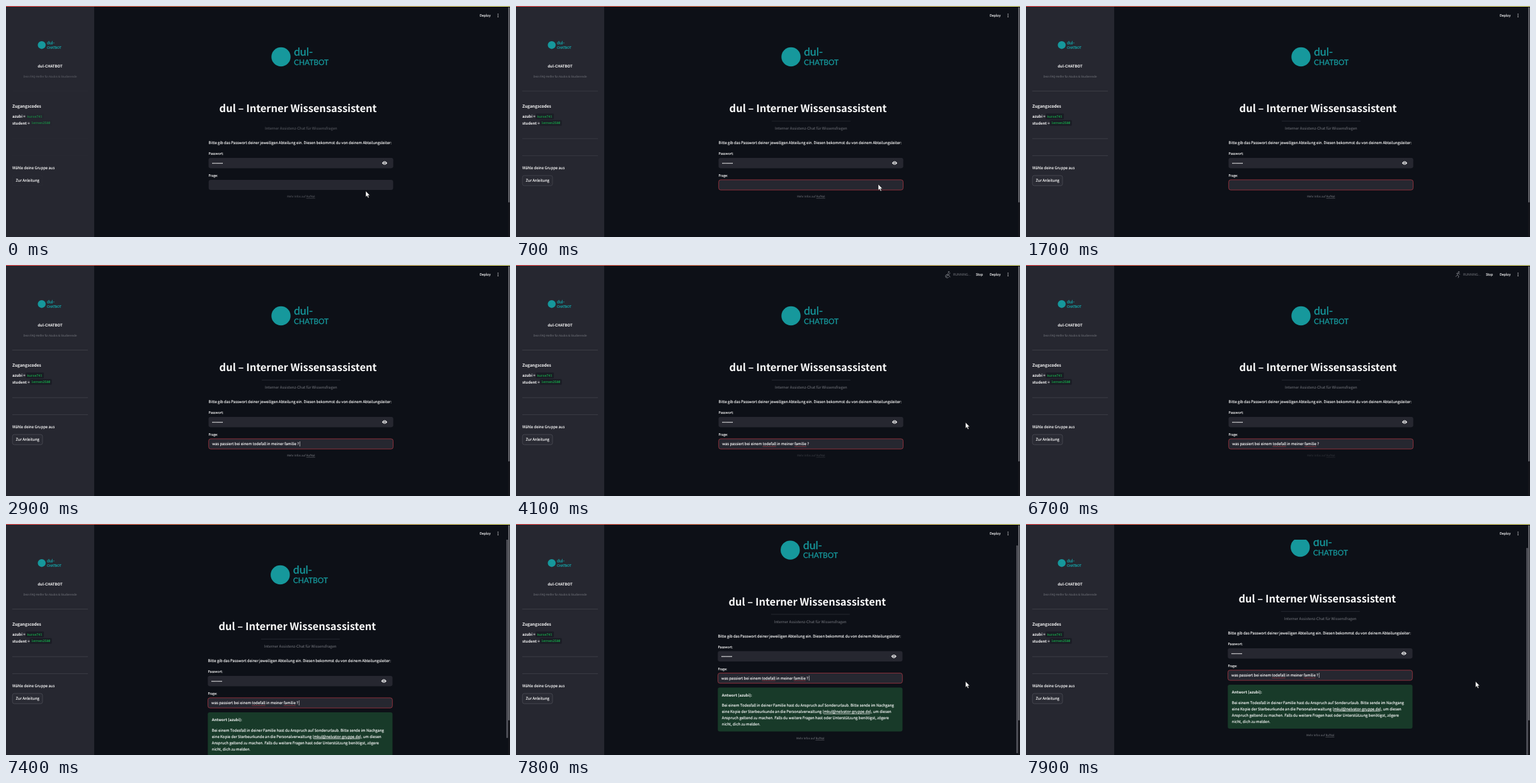
Animation of 800 by 368 pixels, one loop 8000 ms. Source, as an HTML page:

```html
<!DOCTYPE html>
<html lang="de">
<head>
<meta charset="utf-8">
<title>Interner Wissensassistent</title>
<style>
  html, body { margin: 0; width: 100%; height: 100%; overflow: hidden; background: #0d1017; }
  svg { display: block; width: 800px; height: 368px; }
  text {
    font-family: "Noto Sans CJK JP", "Noto Sans CJK SC", "Noto Sans CJK", "Noto Sans", sans-serif;
    color: #fafafa; fill: currentColor; stroke: currentColor; stroke-width: .14;
    text-rendering: geometricPrecision;
  }
  .bold { font-weight: 700; stroke: none; }
  .mid { text-anchor: middle; }
  .muted { color: #7a7c83; stroke: none; }
  .code { font-family: "Noto Sans Mono", "DejaVu Sans Mono", monospace; color: #17a84b; }
  .word { font-family: Lato, Inter, sans-serif; color: #16989c; stroke-width: .3; }
  .mark { fill: #16989c; }
  .link { text-decoration: underline; }
  .rule { stroke: #42434c; stroke-width: .8; }
  .field { fill: #262730; }
</style>
</head>
<body>
<svg id="stage" viewBox="0 0 800 368"></svg>
<script>
const LOOP = 8000, STEP = 100;
const QUESTION = 'was passiert bei einem todefall in meiner familie ?';
const MISSPELT = ['todefall', 'familie'];
const ANSWER = [
  'Bei einem Todesfall in deiner Familie hast du Anspruch auf Sonderurlaub. Bitte sende im Nachgang',
  'eine Kopie der Sterbeurkunde an die Personalverwaltung (<tspan class="link">mkul@nelvator-gruppe.de</tspan>), um diesen',
  'Anspruch geltend zu machen. Falls du weitere Fragen hast oder Unterstützung benötigst, zögere',
  'nicht, dich zu melden.'
];
// Limbs of the status figure: one path per pose, each with its head position.
const POSES = [
  { head: [687, 11.3], limbs: 'M686 13L684.5 16L687 17.5L686 20.5M684.5 16L682 18.8M683 13.5L686 13L689 15' },
  { head: [685, 11.3], limbs: 'M685 13V16.5L688 17.5L687.5 20.5M685 16.5L682 19.5M682 15.5L685 13.3L688.5 12.5' },
  { head: [685.5, 11], limbs: 'M682 13.5H689M685.5 13V16.5M684.6 13.5V20.5M686.4 13.5V20.5' },
  { head: [687, 11.2], limbs: 'M686.5 12.8L684 15.5L687.5 16.5L689 19.5M682 19.5L689.5 12.8M684 15.3A2.6 2.6 0 1 0 686.8 18.8' }
];

// Page pixels to stage font size (page zoom and the font's larger em).
const size = px => (px * .374).toFixed(2);
const text = (x, y, px, str, cls = '', id = '') =>
  `<text x="${x}" y="${y}" font-size="${size(px)}" class="${cls}" id="${id}">${str}</text>`;
const rect = (x, y, w, h, attrs) => `<rect x="${x}" y="${y}" width="${w}" height="${h}" ${attrs}/>`;
const rule = (x1, x2, y) => `<path class="rule" d="M${x1} ${y}H${x2}"/>`;
const disc = (x, y, r, cls) => `<circle cx="${x}" cy="${y}" r="${r}" class="${cls}"/>`;
const wordmark = (x, y1, y2, big, small) =>
  `<text class="word" x="${x}" y="${y1}" font-size="${big}">dul-</text>
   <text class="word" x="${x}" y="${y2}" font-size="${small}">CHATBOT</text>`;
const row = (n, make) => Array.from({ length: n }, (_, i) => make(i)).join('');

const sidebar = `
  ${rect(0, 0, 140, 368, 'fill="#262730"')}
  ${disc(56.7, 62.2, 6.2, 'mark')}${wordmark(65, 61, 68, 7, 4.9)}
  ${text(70, 98, 16, 'dul-CHATBOT', 'bold mid')}
  <g class="soft">${text(70, 113.5, 12, 'Dein FAQ-Helfer für Azubis &amp; Studierende', 'muted mid')}</g>
  <g class="faint">${rule(10, 130, 135.6)}${rule(10, 130, 211.3)}${rule(10, 130, 238.4)}
    ${rect(31.3, 171.3, 28.8, 9, 'rx="1.5" fill="#1a1c24"')}
    ${rect(37.8, 181.8, 34.8, 9, 'rx="1.5" fill="#1a1c24"')}
    ${rect(10.2, 270, 47.8, 16.2, 'rx="3" fill="#2a2b34" stroke="#51525b" stroke-width=".7"')}</g>
  ${text(10, 161.5, 17.6, 'Zugangscodes', 'bold')}
  ${text(10, 177.8, 16, 'azubi =', 'bold')}${text(10, 188.5, 16, 'student =', 'bold')}
  <g class="soft">${text(33.6, 177.6, 13.4, 'kurse741', 'code')}${text(40.2, 188.2, 13.4, 'lernen2580', 'code')}</g>
  ${text(10, 259.6, 16, 'Wähle deine Gruppe aus')}
  ${text(34.2, 280.2, 16, 'Zur Anleitung', 'mid')}`;

const page = `
  ${disc(436.5, 81, 15.2, 'mark')}${wordmark(457, 79, 93.7, 17.6, 11.9)}
  ${text(463.5, 169.2, 44, 'dul – Interner Wissensassistent', 'bold mid')}
  <g class="faint"><g opacity=".6">${rule(406, 531, 183.3)}</g></g>
  <g class="soft">${text(468.3, 197.4, 16, 'Interner Assistenz-Chat für Wissensfragen', 'muted mid')}</g>
  ${text(321.6, 220, 16, 'Bitte gib das Passwort deiner jeweiligen Abteilung ein. Diesen bekommst du von deinem Abteilungsleiter:')}
  ${text(321.6, 237.2, 14, 'Passwort:')}
  ${rect(321.5, 242, 293.2, 16.4, 'rx="3.3" class="field"')}
  <g fill="#fafafa">${row(8, i => `<circle cx="${328.2 + i * 2.15}" cy="250.5" r=".85"/>`)}</g>
  <path fill="#fafafa" d="M596.9 250.2Q601 244.4 605.1 250.2Q601 256 596.9 250.2Z"/>
  <circle cx="601" cy="250.2" r="1.5" fill="#fafafa" stroke="#262730" stroke-width=".9"/>
  ${text(321.6, 272.2, 14, 'Frage:')}
  ${rect(321.7, 276.9, 292.8, 16.2, 'rx="3.3" class="field" id="question" stroke-width=".8"')}
  ${text(327.2, 287.3, 16, QUESTION, '', 'typed')}
  <path id="spelling" stroke="#b83c47" stroke-width=".6"/>
  <path id="caret" stroke="#fafafa" stroke-width=".6"/>
  <g id="answer">
    ${rect(321.5, 300, 293.2, 70, 'rx="3.3" fill="#183a29"')}
    ${text(328, 314, 16, 'Antwort (azubi):', 'bold')}
    ${row(ANSWER.length, i => text(328, 330.8 + i * 9.95, 16, ANSWER[i]))}
  </g>
  <g id="footer"><g class="soft">${text(468.4, 305.4, 12, 'Mehr Infos auf <tspan class="link">RufNal</tspan>', 'muted mid')}</g></g>`;

const header = `
  ${rect(140, 0, 657, 25, 'fill="#0d1017"')}
  ${text(752, 17.2, 14, 'Deploy')}
  <g fill="#fafafa">${row(3, i => `<circle cx="781" cy="${12.9 + i * 2.2}" r=".7"/>`)}</g>
  <g id="status">
    <g stroke="#7b7d84" stroke-width=".9" fill="none"><path id="limbs"/><circle id="head" r=".9"/></g>
    ${text(694, 17.2, 14, 'RUNNING...', 'muted')}${text(730, 17.2, 14, 'Stop')}
  </g>`;

const $ = id => document.getElementById(id);
$('stage').innerHTML = `
  <defs><linearGradient id="glow"><stop stop-color="#ff4b4b"/><stop offset="1" stop-color="#fffd80"/></linearGradient></defs>
  ${rect(0, 0, 800, 368, 'fill="#0d1017"')}
  <g id="page">${page}</g>
  ${rect(794.2, 0, 2.6, 341, 'rx="1.3" fill="#55565e" id="thumb"')}
  ${header}${sidebar}
  ${rect(797, 1, 3, 367, 'fill="#15161c"')}${rect(797.4, 2, 1.8, 311, 'rx=".9" fill="#77787e"')}
  ${rect(0, 0, 800, 1, 'fill="url(#glow)"')}
  <path id="pointer" fill="#fff" stroke="#111" stroke-width=".5"
    d="M0 0V9.4L2.1 7.5L3.7 11L5.2 10.3L3.7 6.9H6.6Z"/>`;

const typed = $('typed');
$('spelling').setAttribute('d', MISSPELT.map(word => {
  const at = QUESTION.indexOf(word);
  const from = typed.getStartPositionOfChar(at).x;
  const to = typed.getEndPositionOfChar(at + word.length - 1).x;
  return `M${from} 289.2H${to}`;
}).join(''));

const clamp = v => Math.min(1, Math.max(0, v));
const progress = (t, from, to) => clamp((t - from) / (to - from));
const smooth = p => p * p * (3 - 2 * p);
const mix = (a, b, p) => a + (b - a) * p;
const show = (id, on) => $(id).setAttribute('visibility', on ? 'visible' : 'hidden');
const fade = (cls, value) => document.querySelectorAll(cls).forEach(el => el.style.opacity = value);

function pointerAt(t) {
  if (t < 800) {
    const p = smooth(progress(t, 100, 500));
    return [mix(571, 575, p), mix(294.8, 284, p)];
  }
  if (t >= 3200 && t < 5000) {
    const p = smooth(progress(t, 3200, 3600));
    return [mix(575, 713.5, p), mix(284, 250.8, p)];
  }
  return t >= 7500 ? [713.5, 250.8] : null;
}

function render(t) {
  const settle = progress(t, 0, 900);
  fade('.soft', mix(.75, 1, settle));
  fade('.faint', mix(.1, 1, settle));

  const overflow = t >= 7300, answered = t >= 7400;
  const scrolled = smooth(progress(t, 7400, 7900));
  const scroll = 44 * scrolled;
  $('page').setAttribute('transform', `translate(${overflow ? -1.2 : 0} ${-scroll})`);
  show('thumb', overflow);
  const thumbTop = 38 * scrolled;
  $('thumb').setAttribute('y', thumbTop);
  $('thumb').setAttribute('height', mix(341, 368, scrolled) - thumbTop);
  show('answer', answered);

  $('question').setAttribute('stroke', t >= 700 ? '#a83642' : 'none');
  const count = Math.round(QUESTION.length * progress(t, 1700, 2700));
  typed.textContent = QUESTION.slice(0, count);
  show('spelling', t >= 3100);
  show('caret', (t > 1700 && t < 3100) || answered);
  $('caret').setAttribute('d', `M${328.6 + typed.getComputedTextLength()} 281V289`);

  show('status', t >= 3500 && !overflow);
  const pose = POSES[Math.floor(Math.max(0, t - 3500) / 200) % POSES.length];
  $('limbs').setAttribute('d', pose.limbs);
  $('head').setAttribute('cx', pose.head[0]);
  $('head').setAttribute('cy', pose.head[1]);

  $('footer').style.opacity = answered ? 1 : mix(1, .33, progress(t, 3500, 4200));
  $('footer').setAttribute('transform', `translate(0 ${answered ? 77 : 0})`);

  const spot = pointerAt(t);
  show('pointer', spot);
  if (spot) $('pointer').setAttribute('transform', `translate(${spot})`);
}

const start = performance.now();
function tick() {
  const t = (performance.now() - start) % LOOP;
  render(Math.floor(t / STEP) * STEP);
  requestAnimationFrame(tick);
}
tick();
</script>
</body>
</html>
```
